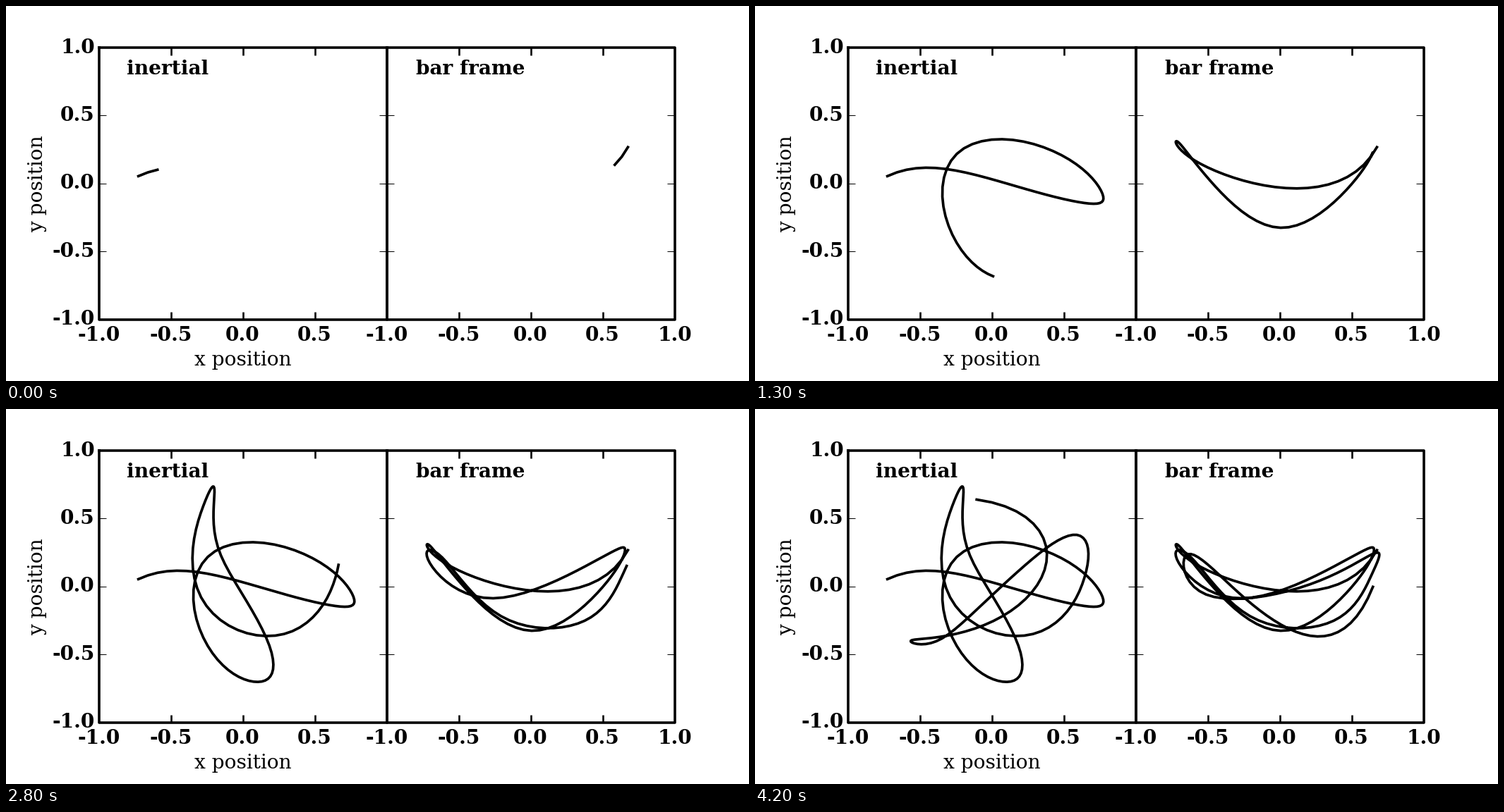
A matplotlib script that plays this animation: 1053 by 532 pixels, repeating every 4300 ms.

```python
import numpy as np
import matplotlib.pyplot as plt
from matplotlib.animation import FuncAnimation

WIDTH, HEIGHT, DPI = 1053, 532, 100
FRAMES, INTERVAL = 43, 100
STEPS_PER_FRAME = 5
PT = 72 / DPI  # points per pixel

LEFT, MIDDLE, RIGHT = 131.5, 539.5, 947.5
TOP, BOTTOM = 59, 444.5
CENTER_Y = (TOP + BOTTOM) / 2
UNIT_X, UNIT_Y = (MIDDLE - LEFT) / 2, (BOTTOM - TOP) / 2

# The orbit seen from the bar: one key position for every two frames.
ORBIT = [
    0.676 + 0.267j, 0.044 - 0.034j, -0.593 + 0.171j, -0.709 + 0.308j,
    -0.487 + 0.026j, 0.007 - 0.326j, 0.500 - 0.005j, 0.656 + 0.273j,
    0.437 + 0.181j, -0.260 - 0.087j, -0.700 + 0.172j, -0.615 + 0.214j,
    -0.205 - 0.219j, 0.376 - 0.252j, 0.641 + 0.090j, 0.659 + 0.245j,
    0.209 + 0.015j, -0.511 - 0.059j, -0.637 + 0.237j, -0.286 - 0.045j,
    0.213 - 0.363j, 0.648 - 0.003j,
]
FRAMES_PER_KEY = 2
BAR_ANGLE, BAR_SPEED = 154.2, 7.27  # degrees, degrees per frame

plt.rcParams["font.family"] = "DejaVu Serif"
plt.rcParams["font.size"] = 28 * PT


def spline(keys, at):
    """Not-a-knot cubic spline through evenly spaced keys."""
    keys = np.array(keys)
    n = len(keys)
    matrix = np.diag(np.full(n, 4.0)) + np.eye(n, k=1) + np.eye(n, k=-1)
    matrix[0], matrix[-1] = 0, 0
    matrix[0, :3] = matrix[-1, -3:] = 1, -2, 1
    bend = np.linalg.solve(matrix, 6 * np.pad(np.diff(keys, 2), 1))
    i = np.clip(at.astype(int), 0, n - 2)
    b = at - i
    a = 1 - b
    return (a * keys[i] + b * keys[i + 1]
            + ((a**3 - a) * bend[i] + (b**3 - b) * bend[i + 1]) / 6)


fig = plt.figure(figsize=(WIDTH / DPI, HEIGHT / DPI), dpi=DPI, facecolor="white")
ax = fig.add_axes([0, 0, 1, 1])
ax.set(xlim=(0, WIDTH), ylim=(HEIGHT, 0))
ax.axis("off")


def line(xs, ys, width, cap="butt"):
    return ax.plot(xs, ys, color="black", lw=width * PT, solid_capstyle=cap)[0]


def label(x, y, text, **style):
    ax.text(x, y, text, **{"ha": "center", "va": "baseline", "weight": "bold", **style})


def draw_panel(left, right):
    center = (left + right) / 2
    line([left, right, right, left, left], [TOP, TOP, BOTTOM, BOTTOM, TOP], 3.6, "projecting")
    for value in (-0.5, 0, 0.5):
        x, y = center + value * UNIT_X, CENTER_Y - value * UNIT_Y
        for edge, inward in ((TOP, 10.5), (BOTTOM, -10.5)):
            line([x, x], [edge, edge + inward], 2.6)
        for edge, inward in ((left, 10.5), (right, -10.5)):
            line([edge, edge + inward], [y, y], 1)


draw_panel(LEFT, MIDDLE)
draw_panel(MIDDLE, RIGHT)
for value in (-1, -0.5, 0, 0.5, 1):
    label(126, CENTER_Y - value * UNIT_Y + 7.6, f"{value:.1f}", ha="right")
    label((MIDDLE + RIGHT) / 2 + value * UNIT_X, 475, f"{value:.1f}")
    if value < 1:  # the right panel's first label covers the shared edge
        label((LEFT + MIDDLE) / 2 + value * UNIT_X, 475, f"{value:.1f}")
label(171.5, 96.8, "inertial", ha="left")
label(581, 96.8, "bar frame", ha="left")
label(336, 509.5, "x position", weight="normal")
label(52, CENTER_Y, "y position", weight="normal", rotation=90, rotation_mode="anchor")

elapsed = np.arange((FRAMES - 1) * STEPS_PER_FRAME + 1) / STEPS_PER_FRAME
bar_view = spline(ORBIT, elapsed / FRAMES_PER_KEY)
inertial_view = bar_view * np.exp(1j * np.radians(BAR_ANGLE + BAR_SPEED * elapsed))

views = [(inertial_view, (LEFT + MIDDLE) / 2), (bar_view, (MIDDLE + RIGHT) / 2)]
trails = [line([], [], 3.7, "projecting") for _ in views]


def update(frame):
    shown = 3 + STEPS_PER_FRAME * frame
    for trail, (view, center) in zip(trails, views):
        path = view[:shown]
        trail.set_data(center + path.real * UNIT_X, CENTER_Y - path.imag * UNIT_Y)
    return trails


animation = FuncAnimation(fig, update, frames=FRAMES, interval=INTERVAL, repeat=True, repeat_delay=0)
plt.show()
```
